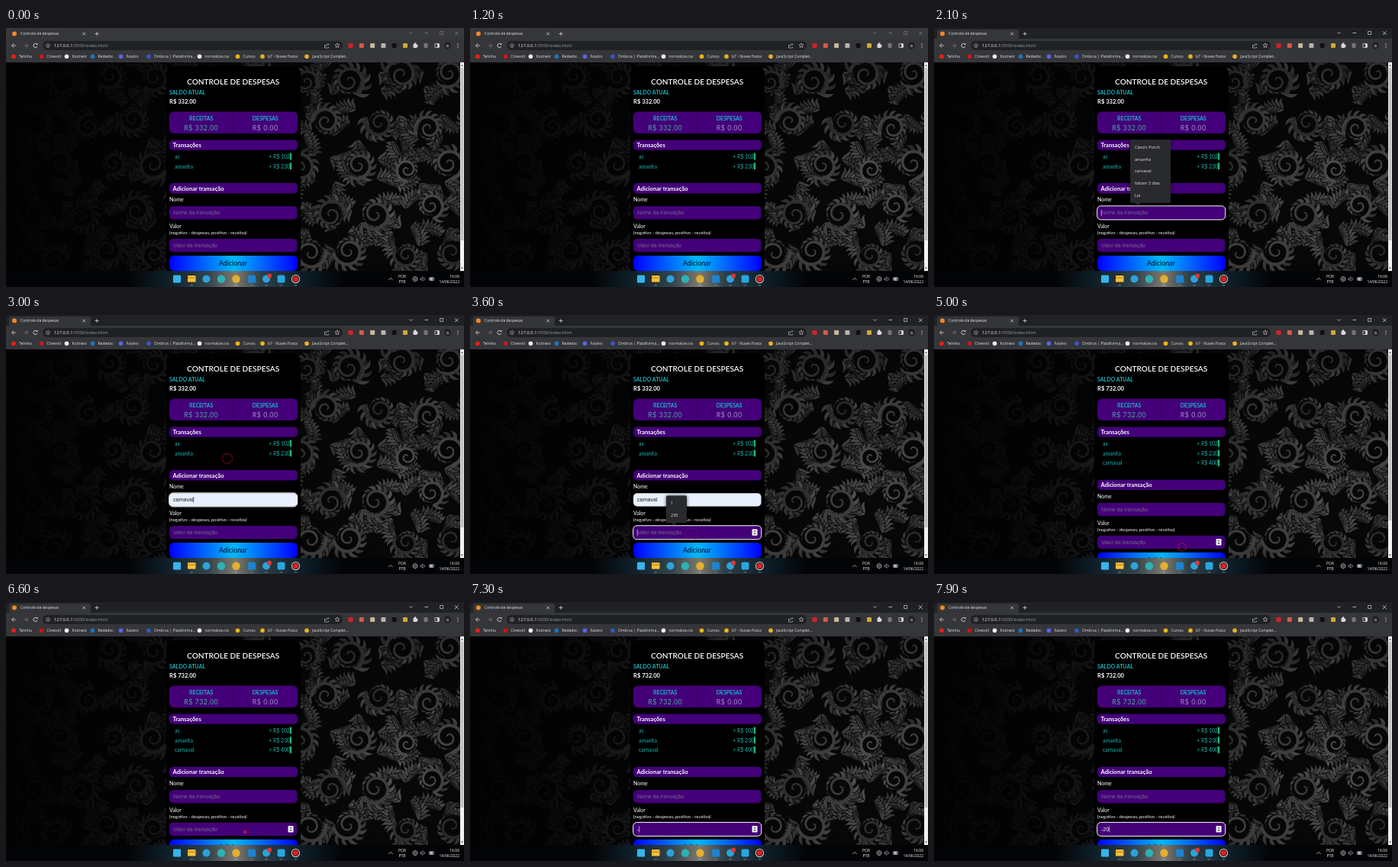
An HTML page with a canvas for the animation above (8000 ms loop, 600 by 339 pixels).

```html
<!DOCTYPE html>
<html lang="pt-BR">
<head>
<meta charset="utf-8">
<title>Controle de despesas</title>
<style>
html, body { margin: 0; width: 100%; height: 100%; overflow: hidden; background: #000; }
canvas { display: block; width: 600px; height: 339px; }
</style>
</head>
<body>
<canvas id="stage"></canvas>
<script>
const W = 600, H = 339, LOOP = 8000;
const dpr = window.devicePixelRatio || 1;
const UI = '"Open Sans", "Noto Sans", sans-serif';
const PAGE = 'Lato, sans-serif';
const FIELD = '"Liberation Sans", Arial, sans-serif';
const PURPLE = '#430079', CYAN = '#16cbd6', TEAL = '#18b8b4', ICON = '#d5d7da', FADED = '#7c7e82';

const makeCanvas = el => {
  el.width = W * dpr;
  el.height = H * dpr;
  const ctx = el.getContext('2d');
  ctx.scale(dpr, dpr);
  return ctx;
};
const g = makeCanvas(document.getElementById('stage'));

// ---- drawing helpers ----
function rect(x, y, w, h, fill, r = 0) {
  g.fillStyle = fill;
  g.beginPath();
  g.roundRect(x, y, w, h, r);
  g.fill();
}
function frame(x, y, w, h, color, r = 0, width = 1) {
  g.strokeStyle = color;
  g.lineWidth = width;
  g.beginPath();
  g.roundRect(x, y, w, h, r);
  g.stroke();
}
function dot(x, y, r, fill) {
  g.fillStyle = fill;
  g.beginPath();
  g.arc(x, y, r, 0, 7);
  g.fill();
}
function ring(x, y, r, color, width = 0.8, from = 0, to = 2 * Math.PI) {
  g.strokeStyle = color;
  g.lineWidth = width;
  g.beginPath();
  g.arc(x, y, r, from, to);
  g.stroke();
}
function line(points, color = ICON, width = 0.8, close = false) {
  g.strokeStyle = color;
  g.lineWidth = width;
  g.beginPath();
  points.forEach(([x, y]) => g.lineTo(x, y));
  if (close) g.closePath();
  g.stroke();
}
function triangle(x, y, w, h, fill) {
  g.fillStyle = fill;
  g.beginPath();
  g.moveTo(x - w, y);
  g.lineTo(x + w, y);
  g.lineTo(x, y + h);
  g.fill();
}
function text(s, x, y, font, color, align = 'left', spacing = 0) {
  g.font = font;
  g.fillStyle = color;
  g.textAlign = align;
  g.letterSpacing = spacing + 'px';
  g.fillText(s, x, y);
}
function addStops(gradient, stops) {
  stops.forEach(([p, color]) => gradient.addColorStop(p, color));
  return gradient;
}

// ---- floral wallpaper, painted once ----
const paper = document.createElement('canvas');
function paintPaper() {
  const c = makeCanvas(paper);
  const DARK = '#080808';
  let seed = 11;
  const rnd = () => (seed = (seed * 16807) % 2147483647) / 2147483647;
  const gray = () => {
    const v = Math.round(50 + rnd() * 32);
    return `rgb(${v},${v},${v})`;
  };

  function leaf(x, y, a, len, w) {
    c.save();
    c.translate(x, y);
    c.rotate(a);
    c.beginPath();
    c.moveTo(0, 0);
    c.bezierCurveTo(len * 0.1, -w, len * 0.8, -w * 1.1, len, w * 0.6);
    c.bezierCurveTo(len * 0.7, -w * 0.1, len * 0.3, w * 0.6, 0, 0);
    c.strokeStyle = DARK;
    c.lineWidth = 1.4;
    c.stroke();
    c.fillStyle = gray();
    c.fill();
    c.restore();
  }
  // a fan of leaves along a bending stem
  function frond(x, y, a, dir) {
    for (let i = 0; i < 7; i++) {
      const len = 17 - i * 1.5;
      leaf(x, y, a + 0.7, len, 5);
      leaf(x, y, a - 0.7, len, -5);
      x += Math.cos(a) * 4.5;
      y += Math.sin(a) * 4.5;
      a += dir * 0.2;
    }
  }
  // a spiral with a leafy rim
  function curl(x, y, r, a, dir) {
    const at = p => {
      const q = a + dir * p * 10, d = r * (1 - 0.9 * p);
      return [x + Math.cos(q) * d, y + Math.sin(q) * d, q];
    };
    for (let p = 0; p < 0.6; p += 0.045) {
      const [lx, ly, q] = at(p);
      leaf(lx, ly, q + dir * 0.9, r * (0.8 - p * 0.7), dir * r * 0.24);
    }
    c.fillStyle = DARK;
    c.beginPath();
    c.arc(x, y, r * 0.72, 0, 7);
    c.fill();
    c.lineCap = 'round';
    c.strokeStyle = gray();
    for (let p = 0; p < 1; p += 0.02) {
      c.lineWidth = 1.2 + r * 0.17 * (1 - p);
      c.beginPath();
      c.moveTo(...at(p).slice(0, 2));
      c.lineTo(...at(p + 0.02).slice(0, 2));
      c.stroke();
    }
  }

  c.fillStyle = DARK;
  c.fillRect(0, 0, W, H);
  const turn = () => rnd() < 0.5 ? 1 : -1;
  for (let y = 45; y < H; y += 30)
    for (let x = 0; x < W; x += 30) frond(x + rnd() * 14, y + rnd() * 14, rnd() * 6.3, turn());
  for (let row = 0; row < 5; row++)
    for (let col = 0; col < 10; col++)
      curl(col * 64 + (row % 2) * 32 + rnd() * 16, 66 + row * 58 + rnd() * 16 - 8,
        15 + rnd() * 6, rnd() * 6.3, turn());

  c.fillStyle = addStops(c.createRadialGradient(510, 230, 0, 510, 230, 510), [
    [0, 'rgba(2,2,2,0)'], [0.3, 'rgba(2,2,2,.3)'], [0.6, 'rgba(2,2,2,.7)'],
    [0.8, 'rgba(2,2,2,.87)'], [1, 'rgba(2,2,2,.98)']
  ]);
  c.fillRect(0, 0, W, H);
}

// ---- browser and taskbar ----
const bookmarks = [
  [10, '#e62117', 'Telinha'], [46.5, '#d3131b', 'Cinevolt'], [79.5, '#eeeeee', 'Kodnest'],
  [113.5, '#1479c4', 'Rededoc'], [150.5, '#5865f2', 'Falatro'], [187, '#3558c8', 'Ombrus | Plataforma...'],
  [253.5, '#eeeeee', 'normalize.css'], [303.5, '#e9b51c', 'Cursos'],
  [336, '#e9b51c', 'b7 - Nuvex Pasta'], [394, '#e9b51c', 'JavaScript Complet...']
];

function drawBrowser(active) {
  const control = active ? ICON : FADED;
  rect(0, 0, W, 15, active ? '#202124' : '#38393d');
  rect(4, 2, 107, 16, '#35363a', 4);
  rect(0, 14, W, 31, '#35363a');
  dot(11, 7.5, 3, '#f08a24');
  text('Controle de despesas', 19, 9.4, '5px ' + UI, '#e2e3e5');
  line([[100.5, 5.8], [104, 9.3]]);
  line([[104, 5.8], [100.5, 9.3]]);
  line([[116.5, 7.5], [121.5, 7.5]]);
  line([[119, 5], [119, 10]]);

  line([[528.5, 5.5], [530.5, 7.5], [532.5, 5.5]], control);
  line([[548.5, 6.5], [553, 6.5]], control);
  frame(568.6, 4.5, 4, 4, control, 0, 0.7);
  line([[588, 4.5], [592.5, 9]], control);
  line([[592.5, 4.5], [588, 9]], control);

  line([[10.3, 20.2], [7.5, 23], [10.3, 25.8]]);
  line([[7.5, 23], [13, 23]]);
  line([[26, 20.2], [28.8, 23], [26, 25.8]], FADED);
  line([[23.3, 23], [28.8, 23]], FADED);
  ring(38.5, 23, 2.6, ICON, 0.9, 0.3, 5.6);
  triangle(40.7, 20.6, 1.4, 1.8, ICON);

  rect(48, 17, 393, 12, '#202124', 6);
  ring(55, 23, 2.3, ICON, 0.6);
  line([[55, 22.6], [55, 24.4]], ICON, 0.6);
  text('127.0.0.1', 63, 25.1, '5.8px ' + UI, '#f1f1f1');
  const w = g.measureText('127.0.0.1').width;
  text(':5500/index.html', 63 + w, 25.1, '5.8px ' + UI, '#9aa0a6');
  line([[418.5, 22], [417.5, 22], [417.5, 26], [422.5, 26], [422.5, 24.5]], ICON, 0.6);
  line([[419, 24], [420, 21.8], [423, 21.5], [421.6, 20]], ICON, 0.6);
  line(Array.from({ length: 10 }, (_, i) => {
    const a = i * Math.PI / 5 - Math.PI / 2, r = i % 2 ? 1.4 : 3.2;
    return [434 + r * Math.cos(a), 23 + r * Math.sin(a)];
  }), ICON, 0.6, true);

  ['#d8201f', '#d8594d', '#c9b79b', '#b9b4ac', '#101010', '#d0aa2c'].forEach((color, i) =>
    rect(448.5 + i * 14.3, 20, 6, 6, color, 1));
  rect(533.5, 21, 5, 5, ICON, 0.8);
  dot(536, 20.6, 1.3, ICON);
  dot(538.6, 23.5, 1.2, ICON);
  [21, 23, 25].forEach(y => line([[547.5, y], [552.5, y]]));
  frame(562, 20.5, 5.5, 5, ICON, 0.5, 0.8);
  rect(565, 20.5, 2.5, 5, ICON);
  dot(578.5, 23, 4.2, '#17191c');
  dot(578.5, 23.5, 2.2, '#6b6264');
  [20.7, 23, 25.3].forEach(y => dot(592, y, 0.65, ICON));

  for (const [x, color, label] of bookmarks) {
    dot(x, 37.2, 2.8, color);
    text(label, x + 7, 39, '5px ' + UI, '#e2e3e5');
  }
}

function drawTaskbar() {
  rect(0, 318, W, 21, '#030406');
  rect(160, 318, 280, 21, addStops(g.createLinearGradient(160, 0, 440, 0), [
    [0, '#030406'], [0.2, '#0f222c'], [0.38, '#35454c'], [0.5, '#7d786d'],
    [0.62, '#2e4049'], [0.82, '#0d1d28'], [1, '#030406']
  ]));

  rect(219, 323.5, 10, 10, '#35b4ef', 0.8);
  rect(238, 324, 10.5, 8.5, '#f4c13d', 1);
  rect(238, 326, 10.5, 2, '#d99a1e');
  dot(262.5, 328.5, 5, '#2ca2dc');
  dot(282, 328.5, 5.2, '#2db3b5');
  dot(301.5, 328.5, 5.2, '#e0b132');
  rect(317, 323.5, 10, 10, '#1f83cf', 1.5);
  dot(341, 328.5, 5, '#2ca2dc');
  dot(345, 324.5, 3, '#dd3535');
  rect(355.5, 323.5, 10, 10, '#26a6e0', 2);
  dot(379.5, 328.5, 5.5, '#e8e8e8');
  dot(379.5, 328.5, 4.6, '#25090b');
  dot(379.5, 328.5, 3.6, '#e0201f');
  [243, 301.5, 322, 341, 360.5, 379.5].forEach((x, i) =>
    rect(x - 2, 336.3, 4, 1, i === 1 ? '#5cb8ea' : '#777d82', 0.5));

  line([[501.5, 329.8], [504, 327.3], [506.5, 329.8]]);
  text('POR', 519, 327, '5px ' + UI, '#f0f0f0', 'center');
  text('PTB', 519, 334, '5px ' + UI, '#f0f0f0', 'center');
  ring(536, 328.5, 3, ICON, 0.7);
  line([[533, 328.5], [539, 328.5]], ICON, 0.5);
  line([[536, 325.5], [536, 331.5]], ICON, 0.5);
  line([[543, 327.5], [544.3, 327.5], [546, 325.8], [546, 331.2], [544.3, 329.5], [543, 329.5]], ICON, 0.6, true);
  ring(546, 328.5, 2.6, ICON, 0.6, -0.8, 0.8);
  frame(554.5, 326.5, 6, 4, ICON, 1, 0.7);
  rect(555.3, 327.3, 4, 2.4, ICON);
  text('16:06', 594, 327, '5px ' + UI, '#f0f0f0', 'right');
  text('14/06/2022', 594, 334, '5px ' + UI, '#f0f0f0', 'right');
}

// ---- page parts ----
function heading(label, y) {
  rect(214, y, 168, 13.4, PURPLE, 5);
  text(label, 218.5, y + 9.5, 'bold 7.6px ' + PAGE, '#fff');
}

function input(y, hint, { value = '', focus, filled, caret }) {
  rect(214, y, 167.5, 17.3, filled ? '#e8f0fe' : PURPLE, 5);
  if (focus) frame(213.7, y - 0.3, 168, 18, '#fff', 5, 1);
  text(value || hint, 219, y + 11.2, '7px ' + FIELD, filled ? '#15171c' : value ? '#f2eef6' : '#77688a');
  if (caret) {
    const x = 219.3 + (value ? g.measureText(value).width : 0);
    line([[x, y + 4.8], [x, y + 12.8]], filled ? '#111' : '#fff', 0.6);
  }
}

function spinner(y) {
  rect(369.5, y + 4.2, 7, 8.6, '#efefef', 0.8);
  triangle(373, y + 7.6, 1.7, -1.9, '#444');
  triangle(373, y + 9.4, 1.7, 1.9, '#444');
}

function dropdown(y, w, items, active = -1) {
  const h = items.length * 15.9 + 3.6;
  g.save();
  g.shadowColor = 'rgba(0,0,0,.7)';
  g.shadowBlur = 4;
  rect(257, y, w, h, '#292a2d', 1.5);
  g.restore();
  triangle(267, y + h, 3.5, 3.2, '#292a2d');
  if (active >= 0) rect(257, y + 1.8 + active * 15.9, w, 15.9, '#424347');
  items.forEach((s, i) => text(s, 263, y + 11.6 + i * 15.9, '5.5px ' + UI, '#e3e4e6'));
}

// ---- timeline, in ms ----
const T = { activate: 1700, name: 1900, pick: 2900, value: 3450, add: 4900, again: 6800 };
const firstKeys = [[3900, '4'], [4100, '0'], [4250, '0']];
const lastKeys = [[7300, '-'], [7600, '2'], [7750, '0']];
const clicks = [[1680, 268, 242], [2720, 290, 188], [3250, 290, 287], [4790, 325, 304], [6580, 313, 301]];
const typed = (t, keys) => keys.filter(k => t >= k[0]).map(k => k[1]).join('');
const during = (t, a, b) => t >= a && t < b;
const blink = (t, from) => (t - from) % 1000 < 500;

function drawPage(t) {
  const added = t >= T.add, dy = added ? 12.7 : 0;
  const total = added ? 'R$ 732.00' : 'R$ 332.00';

  g.drawImage(paper, 0, 0, W, H);
  rect(210, 50, 176, 290, '#000', 10);
  text('CONTROLE DE DESPESAS', 297.7, 73.8, '600 10.1px ' + PAGE, '#fff', 'center');
  text('SALDO ATUAL', 214, 87.4, '600 7px ' + PAGE, CYAN);
  text(total, 214, 99, 'bold 7.6px ' + PAGE, '#fff');

  rect(214, 109.5, 168, 28.5, PURPLE, 6);
  line([[298, 109.5], [298, 138]], '#2a0050', 0.8);
  text('RECEITAS', 255.7, 121.2, '600 7px ' + PAGE, CYAN, 'center');
  text('DESPESAS', 339.7, 121.2, '600 7px ' + PAGE, CYAN, 'center');
  text(total, 255.7, 133.8, '8.8px ' + PAGE, '#4aab9d', 'center', 0.5);
  text('R$ 0.00', 339.7, 133.8, '8.8px ' + PAGE, '#a18fbe', 'center', 0.5);

  heading('Transações', 146.4);
  const rows = [['as', 102], ['amanha', 230]];
  if (added) rows.push(['carnaval', 400]);
  rows.forEach(([name, amount], i) => {
    const y = 170.9 + i * 12.7;
    text(name, 221, y, '7px ' + PAGE, TEAL);
    text('+ R$ ' + amount, 371.8, y, '6.8px ' + PAGE, TEAL, 'right');
    rect(371.8, y - 7.2, 2.3, 8.8, '#2bb673');
  });

  const retry = t >= T.again;
  const onName = during(t, T.name, T.value);
  const onValue = during(t, T.value, T.add) || retry;
  const picked = during(t, T.pick, T.add);
  const keys = retry ? lastKeys : firstKeys;
  const value = added && !retry ? '' : typed(t, keys);
  const lastEdit = keys.reduce((a, [k]) => t >= k ? k : a, retry ? T.again : T.value);

  heading('Adicionar transação', 203 + dy);
  text('Nome', 214, 227.3 + dy, '7px ' + PAGE, '#fff');
  input(233.2 + dy, 'Nome da transação', {
    value: picked ? 'carnaval' : '', filled: picked, focus: onName,
    caret: onName && blink(t, picked ? T.pick : T.name)
  });
  text('Valor', 214, 262 + dy, '7px ' + PAGE, '#fff');
  text('(negativo - despesas, positivo - receitas)', 214, 269.8 + dy, '5.85px ' + PAGE, '#f4f4f4');
  input(276 + dy, 'Valor da transação', { value, focus: onValue, caret: onValue && blink(t, lastEdit) });
  if (t >= T.value) spinner(276 + dy);

  rect(214, 298 + dy, 168, 20, addStops(g.createLinearGradient(214, 0, 382, 0), [
    [0, '#0000ff'], [0.5, '#00b8ff'], [1, '#0000ff']
  ]), 6);
  text('Adicionar', 297.3, 310.8 + dy, '8.8px ' + PAGE, '#05061c', 'center');

  for (const [at, x, y] of clicks) {
    const p = (t - at) / 400;
    if (p >= 0 && p < 1) ring(x, y, 1 + 8 * p, `rgba(225,20,45,${1 - p * 0.8})`, 1.6 - 0.8 * p);
  }
  if (during(t, T.name, T.pick)) {
    const active = t >= 2650 ? 2 : t >= 2500 ? 3 : -1;
    dropdown(146, 53, ["Clara's Porch", 'amanha', 'carnaval', 'faltam 3 dias', 'Lia'], active);
  }
  if (onValue && !value) dropdown(236.5 + dy, 27, ['1', '230']);

  rect(595, 45, 5, 273, '#f1f1f1');
  rect(595.6, 52, 3.8, added ? 217 : 226, '#c1c1c1');
  triangle(597.5, 50, 1.5, -2, '#555');
  triangle(597.5, 313.5, 1.5, 2, '#555');
}

function tick() {
  const t = performance.now() % LOOP;
  drawPage(t);
  drawBrowser(t >= T.activate);
  drawTaskbar();
  requestAnimationFrame(tick);
}
paintPaper();
tick();
</script>
</body>
</html>
```
